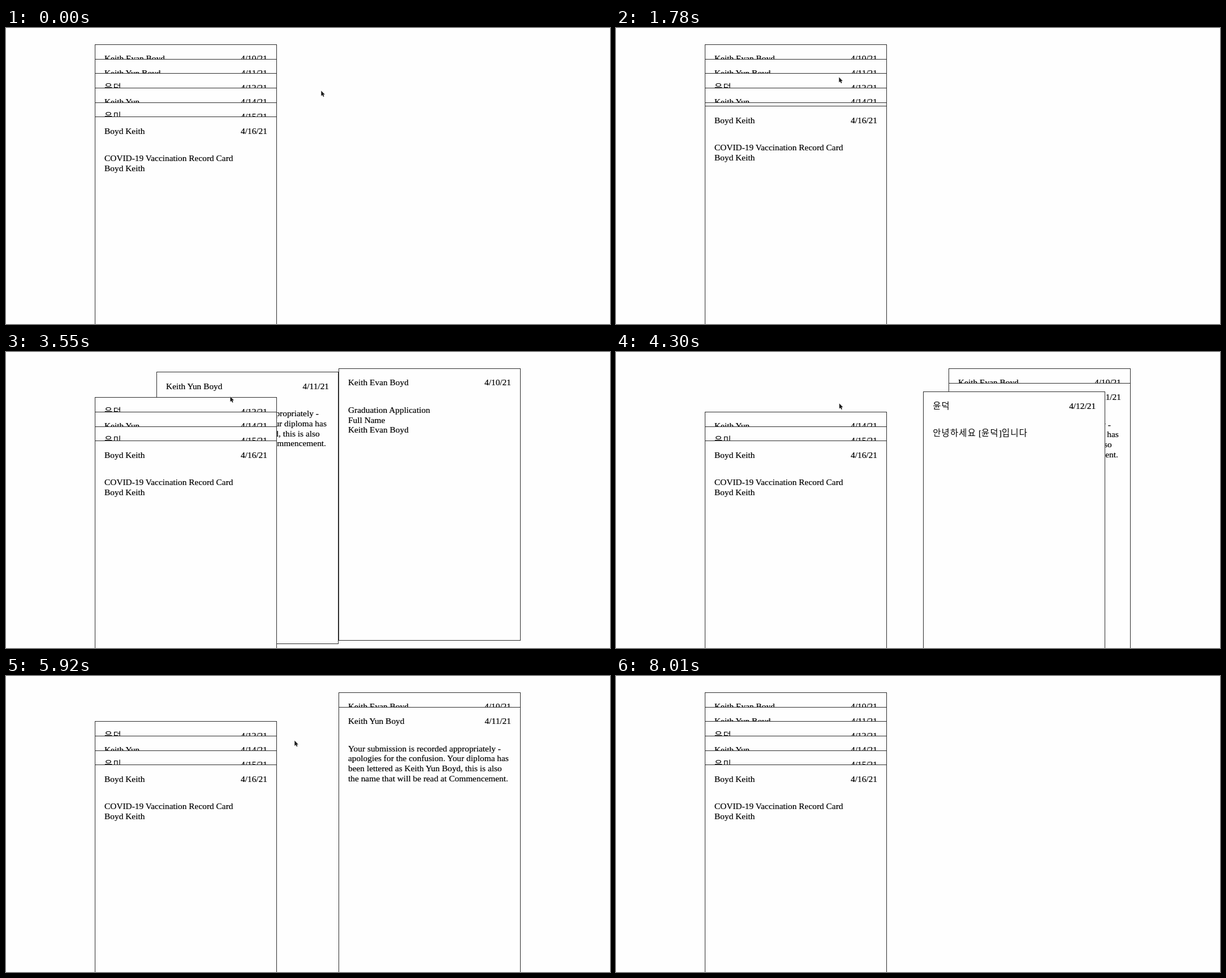
Animation of 1068x525 px, one loop 8.59 s. Source, as an HTML page:

```html
<!DOCTYPE html>
<html lang="en">
<head>
<meta charset="utf-8">
<title>Name cards</title>
<style>
  html, body { margin: 0; width: 100%; height: 100%; overflow: hidden; background: #fefefe; }
  body {
    position: relative; color: #000; -webkit-text-stroke: .2px #000;
    font: 15.4px/17.7px "Liberation Serif", "Times New Roman", serif;
  }
  .card {
    position: absolute; box-sizing: border-box; width: 322px; height: 483px;
    padding: 15.3px 16px; border: 1px solid #2c2c2c; background: #fefefe; white-space: pre;
  }
  .head { display: flex; justify-content: space-between; height: 17.7px; margin-bottom: 31px; }
  .ko {
    font: 300 15.4px/0 "Noto Sans CJK KR", "Noto Sans CJK", "Noto Sans CJK JP", sans-serif;
    letter-spacing: .08em; -webkit-text-stroke: 0;
  }
  svg { position: absolute; left: 0; top: 0; overflow: visible; }
</style>
</head>
<body>
<script>
const LOOP = 8590, STEP = 148.1, LAST = 54, MOVE = 300, TICK = 5;
const LEFT = 157, SHIFT = 431, TOP = 29, GAP = 25.67, LIFT = 19.3;
const WIDTH = 322, HEIGHT = 483, BODY = 66, LINE = 17.7;

const cards = [
  ['Keith Evan Boyd', '4/10/21', 'Graduation Application\nFull Name\nKeith Evan Boyd'],
  ['Keith Yun Boyd', '4/11/21',
    'Your submission is recorded appropriately -\napologies for the confusion. Your diploma has\n' +
    'been lettered as Keith Yun Boyd, this is also\nthe name that will be read at Commencement.'],
  ['윤덕', '4/12/21', '안녕하세요 [윤덕]입니다'],
  ['Keith Yun', '4/14/21', ''],
  ['윤미', '4/15/21', ''],
  ['Boyd Keith', '4/16/21', 'COVID-19 Vaccination Record Card\nBoyd Keith']
].map(([name, date, body], row) => ({ name, date, body, row, clicks: [], hovers: [] }));

// pointer path: time, x, y
const path = [
  [0, 557, 111], [500, 430, 28], [820, 415, 35], [1480, 402, 160], [1765, 400, 150],
  [1777, 394, 87], [2150, 425, 34], [2820, 412.5, 26], [3300, 398, 66], [3800, 394.5, 91],
  [4300, 394.5, 91], [4640, 640, 118], [5090, 640, 118], [5332, 522, 115], [6170, 505, 114],
  [6664, 660, 105], [7095, 660, 105], [7550, 854, 341], [7780, 854, 341], [7848, 980, 507]
];
const presses = [2650, 3500, 4110, 4880, 6670, 7095];

// the curve of the CSS "ease" keyword
function ease(p) {
  if (p <= 0) return 0;
  if (p >= 1) return 1;
  let lo = 0, hi = 1;
  for (let i = 0; i < 20; i++) {
    const s = (lo + hi) / 2;
    if (.75 * s * (1 - s) + s ** 3 < p) lo = s; else hi = s;
  }
  return .3 * lo * (1 - lo) ** 2 + 3 * (1 - lo) * lo * lo + lo ** 3;
}

// value between 0 and 1 after the toggles that happened before t
function toggled(times, t) {
  let value = 0;
  times.forEach((start, i) => {
    const end = Math.min(t, times[i + 1] ?? t);
    value += ((i + 1) % 2 - value) * ease((end - start) / MOVE);
  });
  return value;
}

function pointer(t) {
  const i = path.findIndex(p => p[0] > t);
  if (i < 0) return path[path.length - 1].slice(1);
  const [t0, x0, y0] = path[i - 1], [t1, x1, y1] = path[i];
  const k = (t - t0) / (t1 - t0);
  return [x0 + (x1 - x0) * k, y0 + (y1 - y0) * k];
}

const place = (card, t) => [
  LEFT + SHIFT * toggled(card.clicks, t),
  TOP + GAP * card.row - LIFT * toggled(card.hovers, t)
];

// topmost card under the pointer
function cardUnder(t) {
  const [x, y] = pointer(t);
  return cards.findLast(card => {
    const [left, top] = place(card, t);
    return x >= left && x < left + WIDTH && y >= top && y < top + HEIGHT;
  });
}

// let the pointer run once to learn when cards are hovered and clicked
function rehearse() {
  let hot;
  for (let t = 0; t < LAST * STEP; t += TICK) {
    const over = cardUnder(t);
    if (over !== hot) {
      hot?.hovers.push(t);
      over?.hovers.push(t);
      hot = over;
    }
    if (presses.includes(t)) over?.clicks.push(t);
  }
}

function isOverBody(t) {
  const card = cardUnder(t);
  if (!card?.body) return false;
  const y = pointer(t)[1] - place(card, t)[1] - BODY;
  return y > 0 && y < LINE * card.body.split('\n').length;
}

const markup = text => text.replace(/[가-힣]+/g, '<span class="ko">$&</span>');

for (const card of cards) {
  card.el = document.createElement('div');
  card.el.className = 'card';
  card.el.innerHTML = `<div class="head"><span>${markup(card.name)}</span><span>${card.date}</span></div>` +
    `<div>${markup(card.body)}</div>`;
  document.body.append(card.el);
}
document.body.insertAdjacentHTML('beforeend', `<svg id="mouse" width="8" height="13">
  <path id="arrow" d="M.3.3V9.6L2.4 7.7 3.9 11 5.5 10.3 4.1 7.1H6.8Z" fill="#1c1c1c" stroke="#fff" paint-order="stroke"/>
  <path id="beam" d="M-2.5-4.5Q0-4.5 0-3Q0-4.5 2.5-4.5M0-3V4M-2.5 5.5Q0 5.5 0 4Q0 5.5 2.5 5.5M-1.2 2H1.2" fill="none" stroke="#222"/>
</svg>`);
const [mouse, arrow, beam] = ['mouse', 'arrow', 'beam'].map(id => document.getElementById(id));

function draw(now) {
  const n = Math.min(LAST, Math.floor(now % LOOP / STEP + .08));
  const t = n * STEP;
  for (const card of cards) {
    const [left, top] = place(card, t);
    card.el.style.left = left + 'px';
    card.el.style.top = top + 'px';
  }
  const [x, y] = pointer(t);
  const onText = isOverBody(t);
  mouse.style.transform = `translate(${x}px, ${y}px)`;
  mouse.style.display = n < LAST ? '' : 'none';
  arrow.style.display = onText ? 'none' : '';
  beam.style.display = onText ? '' : 'none';
}

rehearse();
const begin = performance.now();
function tick() {
  draw(performance.now() - begin);
  requestAnimationFrame(tick);
}
tick();
</script>
</body>
</html>
```
